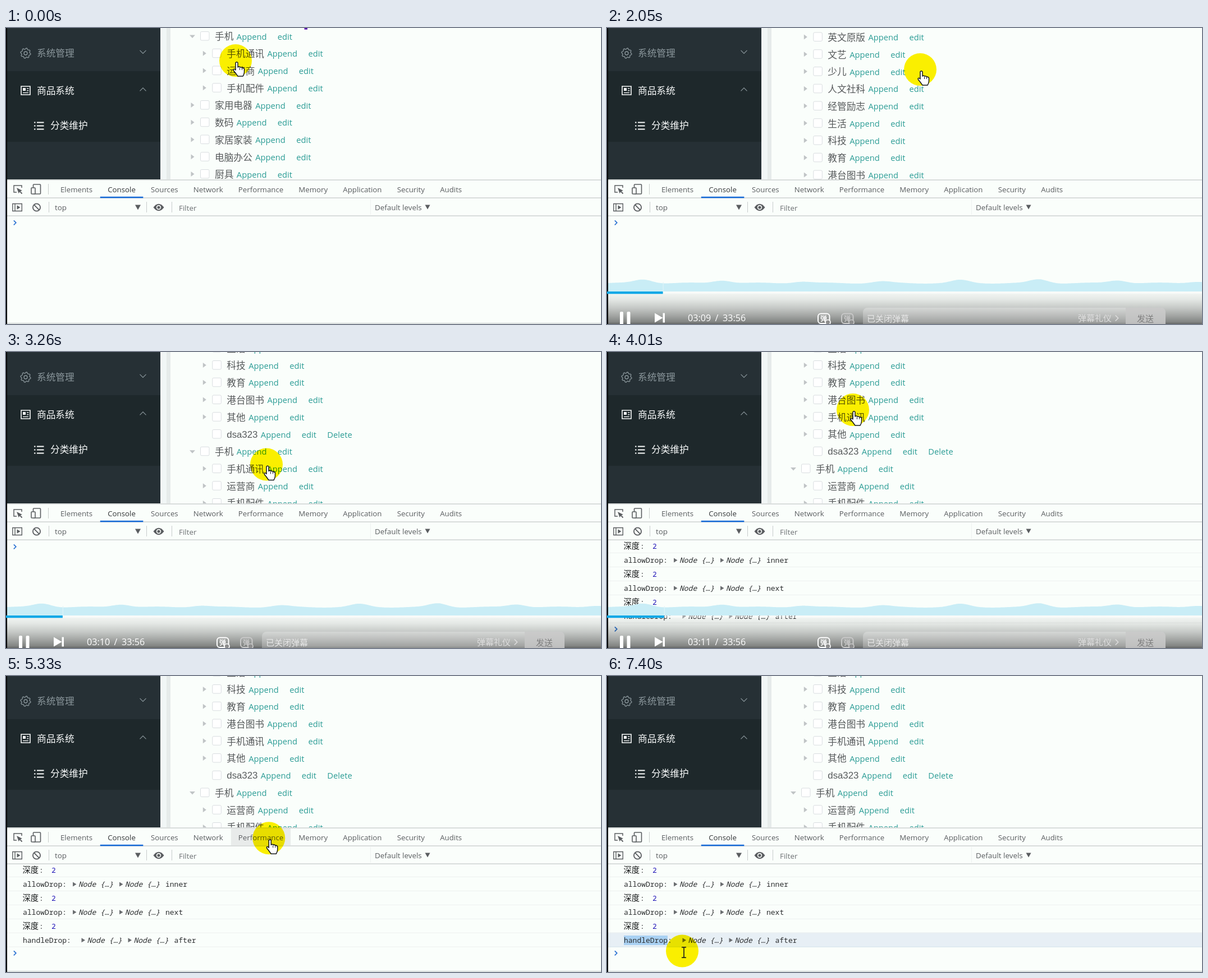
Recreate the animation shown at these times as an HTML page with a canvas. Size 1060 px wide and 528 px high, loop 8000 ms.

```html
<!DOCTYPE html>
<html lang="zh">
<head>
<meta charset="utf-8">
<title>Category tree</title>
<style>
html, body { margin: 0; width: 100%; height: 100%; overflow: hidden; background: #fafefb; }
canvas { display: block; width: 1060px; height: 528px; }
</style>
</head>
<body>
<canvas id="stage" width="1060" height="528"></canvas>
<script>
const ctx = document.getElementById('stage').getContext('2d');
const LOOP = 8000, PITCH = 30.75, CHAR = 7.8;
const PAGE = '#fafefb', INK = '#5a5d60', RULE = '#c8cccc';
const SANS = '"Open Sans", "Noto Sans", sans-serif';
const CJK = '"Noto Sans CJK SC", "Noto Sans CJK", sans-serif';
const ARIAL = '"Liberation Sans", sans-serif';
const MONO = '"Noto Sans Mono", "DejaVu Sans Mono", monospace';

const moved = '手机通讯';
const child = name => ({ name, level: 1 });
const root = name => ({ name, level: 0 });
const before = [
  ...'英文原版 文艺 少儿 人文社科 经管励志 生活 科技 教育 港台图书 其他 dsa323'.split(' ').map(child),
  { name: '手机', level: 0, open: true },
  ...[moved, '运营商', '手机配件'].map(child),
  ...'家用电器 数码 家居家装 电脑办公 厨具'.split(' ').map(root)
];
const after = before.filter(r => r.name !== moved);
after.splice(9, 0, child(moved));

const tabs = 'Elements Console Sources Network Performance Memory Application Security Audits'.split(' ');

// pointer moves: start, end, x, y
const moves = [
  [690, 1000, 395, 16.5], [1100, 1480, 538, 70], [1630, 1950, 558, 74], [2480, 2790, 440, 206],
  [2950, 3260, 464, 200.5], [3280, 3600, 438, 103], [4160, 4420, 528, 316], [4430, 4630, 483, 283],
  [5280, 5750, 33, 472.5], [6030, 6500, 112, 474], [6680, 7400, 134, 490.5]
];

const clamp = v => Math.max(0, Math.min(1, v));
const ease = v => v * v * (3 - 2 * v);
const ramp = (t, a, b) => ease(clamp((t - a) / (b - a)));

function pointerAt(t) {
  const p = { x: 409, y: 58 };
  for (const [a, b, x, y] of moves) {
    const k = ramp(t, a, b);
    p.x += (x - p.x) * k;
    p.y += (y - p.y) * k;
  }
  return p;
}

function text(s, x, y, size, color, family = SANS, style = '') {
  ctx.font = `${style} ${size}px ${family}`;
  ctx.fillStyle = color;
  ctx.fillText(s, x, y);
  return ctx.measureText(s).width;
}
function rect(x, y, w, h, color) {
  ctx.fillStyle = color;
  ctx.fillRect(x, y, w, h);
}
function paint(fill, stroke, width = 1) {
  if (fill) { ctx.fillStyle = fill; ctx.fill(); }
  if (stroke) { ctx.strokeStyle = stroke; ctx.lineWidth = width; ctx.stroke(); }
}
function box(x, y, w, h, r, fill, stroke, width) {
  ctx.beginPath();
  ctx.roundRect(x, y, w, h, r);
  paint(fill, stroke, width);
}
function circle(x, y, r, fill, stroke, width) {
  ctx.beginPath();
  ctx.arc(x, y, r, 0, 7);
  paint(fill, stroke, width);
}
function line(points, color, width) {
  ctx.beginPath();
  points.forEach(([x, y]) => ctx.lineTo(x, y));
  paint(null, color, width);
}
// triangle from the middle of its base; dir 0 points right, 1 down
function triangle(x, y, half, len, dir, color) {
  ctx.beginPath();
  ctx.moveTo(x - (dir ? half : 0), y - (dir ? 0 : half));
  ctx.lineTo(x + (dir ? half : 0), y + (dir ? 0 : half));
  ctx.lineTo(x + (dir ? 0 : len), y + (dir ? len : 0));
  paint(color);
}
const chevronRight = (x, y, s, color, w) => line([[x - s / 2, y - s], [x + s / 2, y], [x - s / 2, y + s]], color, w);
const chevronDown = (x, y, s, color, w) => line([[x - 5.5, y - s / 2], [x, y + s / 2], [x + 5.5, y - s / 2]], color, w);

function drawTree(t) {
  const scroll = 339.75 * ramp(t, 1640, 1930) - 177 * ramp(t, 2180, 2370);
  const grey = '#c0c4c6', teal = '#2b9c95';
  (t < 3800 ? before : after).forEach((row, i) => {
    const y = 15 + PITCH * (i - 11) + scroll;
    if (y < -14 || y > 284) return;
    const dx = row.level * 21.3, leaf = row.name === 'dsa323';
    if (row.open) triangle(332, y - 2.5, 5, 5.5, 1, grey);
    else if (!leaf) triangle(329.5 + dx, y - .5, 4.5, 6, 0, grey);
    box(346.5 + dx, y - 8.5, 15.5, 15.5, 2, '#fff', '#d9dde0', 1);
    const x = 372 + dx;
    const w = leaf ? text(row.name, x, y + 5.5, 16.8, '#56595b', ARIAL)
      : text(row.name, x, y + 6.3, 16.7, '#56595b', CJK);
    const bx = x + w + 5.5;
    text('Append', bx, y + 5.6, 14.7, teal);
    text('edit', bx + 73, y + 5.6, 14.7, teal);
    if (leaf) text('Delete', bx + 118.5, y + 5.6, 14.7, teal);
  });
}

function drawSidebar() {
  const dim = '#8b979c', lit = '#fafcfc';
  rect(275, 0, 11, 270, '#f1f6f6');
  rect(286, 0, 7, 270, '#e6ebea');
  rect(2, 0, 273, 270, '#263035');
  rect(2, 77, 273, 126, '#1e282b');

  ctx.beginPath();
  for (let i = 0; i < 32; i++) {
    const a = (i + .5) * Math.PI / 16, r = i % 4 < 2 ? 9 : 7.3;
    ctx.lineTo(35 + r * Math.cos(a), 45 + r * Math.sin(a));
  }
  ctx.closePath();
  paint(null, dim, 1.3);
  circle(35, 45, 3, null, dim, 1.3);
  text('系统管理', 55, 51.3, 16.7, dim, CJK);
  chevronDown(244, 42.7, 5.5, dim, 1.2);

  box(27, 104, 16, 15, 0, null, lit, 1.6);
  rect(30, 107, 5, 5, lit);
  for (let i = 0; i < 3; i++) rect(i < 2 ? 37 : 30, 107.4 + i * 3.7, i < 2 ? 3.5 : 10, 1.3, lit);
  text('商品系统', 55, 118, 16.7, lit, CJK);
  chevronDown(244, 109.7, -5.5, dim, 1.2);

  for (let y = 167.5; y < 182; y += 6) {
    rect(50, y, 2.5, 2, lit);
    rect(55, y, 12.5, 2, lit);
  }
  text('分类维护', 79, 180.3, 16.7, lit, CJK);
}

function drawTabs(p) {
  let x = 97;
  for (const name of tabs) {
    ctx.font = `13.25px ${SANS}`;
    const w = ctx.measureText(name).width;
    if (p.y > 272 && p.y < 302 && p.x > x - 13 && p.x < x + w + 13) rect(x - 13, 272, w + 26, 30, '#e8ebea');
    const active = name === 'Console';
    text(name, x, 293, 13.25, active ? '#333638' : INK);
    if (active) rect(x - 13.5, 300.8, w + 27, 2.5, '#1469d8');
    x += w + 27.2;
  }
}

function drawTools(p) {
  rect(2, 270, 1058, 258, PAGE);
  for (let y = 270.4; y < 340; y += 32) rect(2, y, 1058, 1.3, RULE);
  rect(2, 526, 1058, 1.3, RULE);

  line([[19, 293], [14, 293], [14, 281], [28, 281], [28, 285]], INK, 1.5);
  ctx.save();
  ctx.translate(19, 285);
  ctx.rotate(-.35);
  ctx.scale(.6, .6);
  ctx.fillStyle = INK;
  ctx.fill(arrow);
  ctx.restore();
  box(48.5, 279, 13, 17, 1, null, INK, 1.6);
  box(45, 285, 7, 11, 1, PAGE, INK, 1.6);
  rect(75, 278, 1, 19, RULE);
  drawTabs(p);

  box(11.8, 313.5, 16.5, 13, 0, null, INK, 1.4);
  rect(15.3, 313.5, 1.4, 13, INK);
  triangle(19.5, 320, 3.7, 6, 0, INK);
  circle(54.5, 320, 6.6, null, INK, 1.8);
  line([[50, 315.4], [59, 324.6]], INK, 1.8);
  for (const x of [76, 250, 295]) rect(x, 310, 1, 19, RULE);
  text('top', 87, 325, 13.4, INK);
  triangle(235, 315.5, 5, 9, 1, INK);
  ctx.beginPath();
  ctx.moveTo(262.5, 320);
  ctx.quadraticCurveTo(272, 307.5, 281.5, 320);
  ctx.quadraticCurveTo(272, 332.5, 262.5, 320);
  paint(INK);
  circle(272, 320, 4.2, PAGE);
  circle(272, 320, 2.6, INK);
  text('Filter', 308, 326, 13.4, '#6c7073');
  rect(649, 305, 1, 28, '#eef1f0');
  text('Default levels', 657, 325, 13.4, INK);
  triangle(751, 315.5, 4.5, 8, 1, INK);
}

function drawLogs(t, p) {
  const ink = '#2c2e30', picked = t > 6100;
  const pairs = Math.max(0, Math.min(3, Math.floor((t - 3200) / 200)));
  const places = ['inner', 'next', 'after'];
  if (picked) {
    rect(2, 457.5, 1058, 25, '#e7eff5');
    const chars = Math.max(0, Math.min(10, Math.round((p.x - 28) / CHAR)));
    rect(30, 463, chars * CHAR, 17, '#a9d1f3');
  }
  for (let i = 0; i < pairs; i++) {
    const last = i === 2, y = 351 + i * 49.9, y2 = y + 25.4;
    rect(2, y + 6.8, 1058, 1, '#edf0ef');
    rect(2, y + 31.8, 1058, 1, last && picked ? '#cbdce8' : '#edf0ef');
    text('深度', 29.5, y + .3, 14.3, '#17191a', CJK);
    text(':', 59, y, 13, ink, MONO);
    text('2', 81, y, 13, '#2216b8', MONO);

    let x = last ? 134.5 : 119;
    text(last ? 'handleDrop:' : 'allowDrop:', 30, y2, 13, ink, MONO);
    for (let n = 0; n < 2; n++, x += 83) {
      triangle(x, y2 - 5, 4, 6.5, 0, '#6a6d70');
      text('Node {…}', x + 10, y2 - .5, 13, ink, MONO, 'italic');
    }
    text(places[i], x - 1, y2, 13, ink, MONO);
  }
  chevronRight(15.8, 347.3 + pairs * 49, 4, '#2b73d2', 1.7);
}

function drawTip(t) {
  ctx.globalAlpha = ramp(t, 4440, 4520) * (1 - ramp(t, 4570, 4690));
  rect(532, 340, 201, 25, '#d9dcdb');
  box(530.5, 338.5, 200, 24, 0, PAGE, '#c9cccb', 1);
  text('e.g. /event\\d/ -cdn url:q.test', 541, 354.5, 12.7, '#777b7c');
  ctx.globalAlpha = 1;
}

function badge(x, color) {
  box(x - 10, 509.5, 20.5, 17.5, 5, null, color, 2);
  text('弹', x - 6, 523, 12, color, CJK, 'bold');
  circle(x + 7.5, 525, 4.5, '#8e8e8e', color, 1.7);
}

function drawPlayer(t) {
  ctx.globalAlpha = ramp(t, 70, 360) * (1 - ramp(t, 4160, 4420));
  const done = 98.5 + (t - 1060) * .0011;

  ctx.beginPath();
  ctx.moveTo(2, 470);
  for (let x = 2; x <= 1060; x += 2) {
    const u = (x - 65) * Math.PI / 141;
    const peak = (4.5 + 2 * Math.cos(u * .4)) * Math.cos(u) ** 8;
    ctx.lineTo(x, 455 - peak - Math.sin(x / 19) * .9);
  }
  ctx.lineTo(1060, 470);
  paint('#c9edf6');
  rect(done, 453, 1, 17, '#e2f5f9');

  const shade = ctx.createLinearGradient(0, 470, 0, 528);
  for (let k = 0; k <= 1; k += .25) shade.addColorStop(k, `rgba(0,0,0,${.02 + .5 * k ** 1.4})`);
  rect(0, 470, 1060, 58, shade);
  rect(0, 470, 1060, 4, 'rgba(255,255,255,.4)');
  rect(0, 470, done, 4.3, '#0ca8e6');

  for (const x of [23, 35.5]) box(x, 506, 6, 26, 2, '#fff');
  triangle(85, 517, 8.5, 14.5, 0, '#fff');
  rect(99.5, 508.5, 3.5, 17, '#fff');
  const sec = 188 + Math.floor((t - 450) / 1000);
  text(`03:${String(sec % 60).padStart(2, '0')}`, 144, 523.3, 16.1, '#fff');
  text('/', 192.5, 523.3, 16.1, '#fff');
  text('33:56', 206, 523.3, 16.1, '#fff');
  badge(386, '#fff');
  badge(428, '#c9c9c9');

  box(456, 499, 539, 40, 8, 'rgba(255,255,255,.25)');
  box(924, 499, 71, 40, [0, 8, 8, 0], 'rgba(200,200,200,.8)');
  text('已关闭弹幕', 463, 524, 15, '#e8e8e8', CJK);
  text('弹幕礼仪', 839, 523, 15, '#dedede', CJK);
  chevronRight(908.2, 517.5, 5, '#dedede', 1.5);
  text('发送', 944, 524, 15, '#7d7d7d', CJK);
  ctx.globalAlpha = 1;
}

const hand = new Path2D('M2 1Q4 0 5 2V10Q7 8 9 10Q11 9 12.5 11Q15 10.5 16.5 13V19Q16 23 14 26H5L0 19Q-4 15-2.5 13.5Q-1 12.5 1 15V2Z');
const arrow = new Path2D('M0 0V18L4 14.5L7.5 22.5L10.5 21L7 13.5H12.5Z');

function drawPointer(t, p) {
  const edge = '#16181c', shape = t < 5420 ? hand : arrow;
  ctx.globalCompositeOperation = 'multiply';
  circle(p.x, p.y, 29, '#fff000');
  ctx.globalCompositeOperation = 'source-over';
  ctx.save();
  ctx.translate(p.x + (shape === hand ? -1 : 2), p.y + 2);
  if (t > 6150) {
    rect(.2, -9, 1.6, 19, edge);
    for (const y of [-9.5, 9]) rect(-3, y, 8, 1.6, edge);
  } else {
    ctx.lineJoin = 'round';
    ctx.fillStyle = '#fff';
    ctx.strokeStyle = edge;
    ctx.lineWidth = 1.5;
    ctx.fill(shape);
    ctx.stroke(shape);
    if (shape === hand) for (const x of [8, 12]) rect(x, 11, 1, 4, edge);
  }
  ctx.restore();
}

function draw(t) {
  const p = pointerAt(t);
  rect(0, 0, 1060, 528, PAGE);
  drawTree(t);
  if (t < 200) rect(531.5, 0, 5.5, 2.7, '#5a1cae');
  drawSidebar();
  drawTools(p);
  drawLogs(t, p);
  drawTip(t);
  rect(0, 0, 2, 528, '#050607');
  drawPlayer(t);
  drawPointer(t, p);
}

const start = performance.now();
function tick() {
  draw((performance.now() - start) % LOOP);
  requestAnimationFrame(tick);
}
tick();
</script>
</body>
</html>
```
